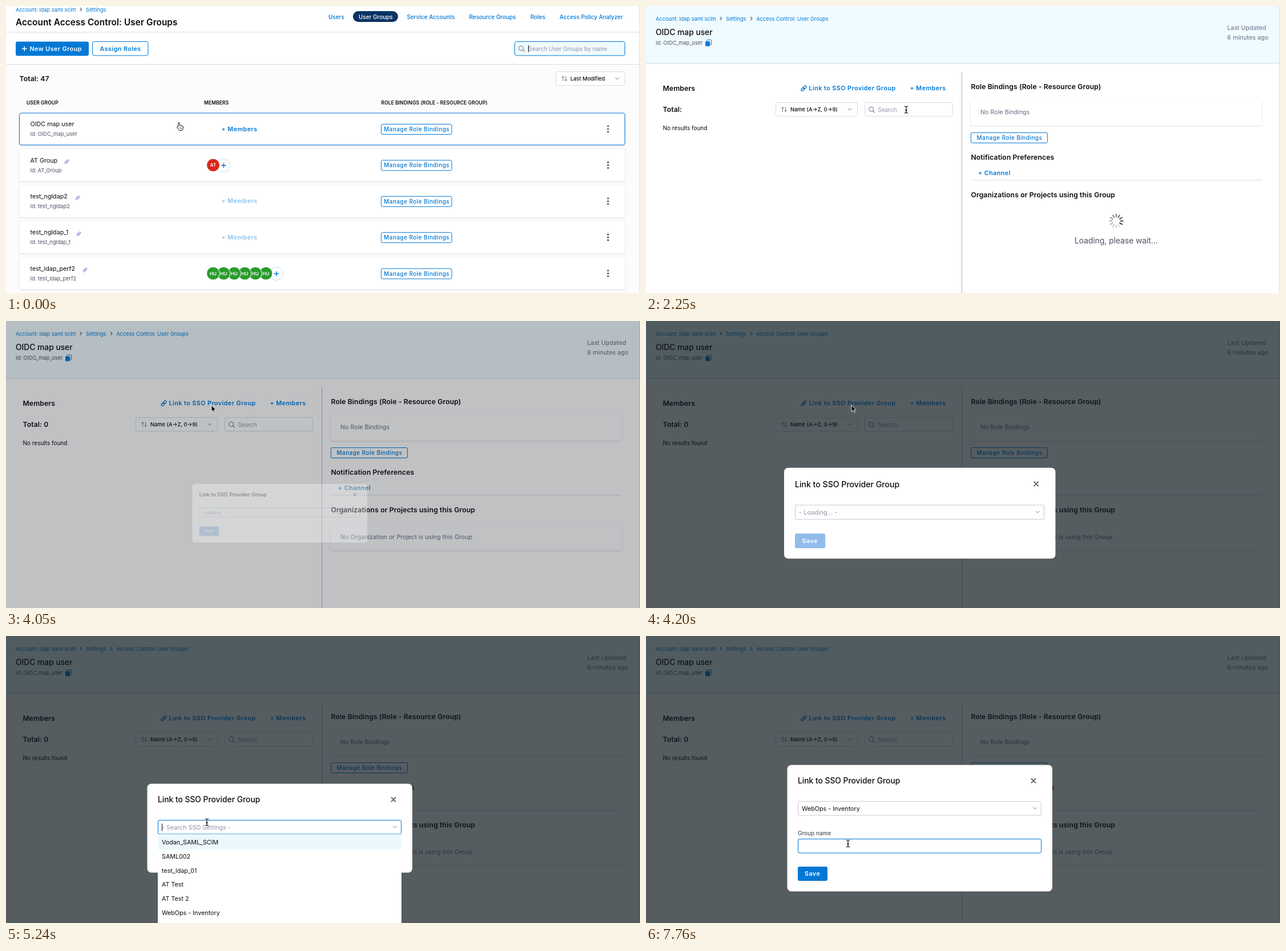
These frames come from a looping animation (1111 by 504 pixels, 8000 ms). An HTML page:

```html
<!DOCTYPE html>
<html lang="en">
<head>
<meta charset="utf-8">
<title>User groups</title>
<style>
  html, body { margin: 0; width: 100%; height: 100%; overflow: hidden; background: #fff; }
  svg { display: block; width: 100vw; height: 100vh; }
  text { font-family: Inter, "Open Sans", sans-serif; font-optical-sizing: none; dominant-baseline: central; white-space: pre; }
</style>
</head>
<body>
<svg id="stage" viewBox="0 0 1111 504"></svg>
<script>
const LOOP = 8000;
const BLUE = '#0278d5', INK = '#0b0b0d', SLATE = '#4f5162', GREY = '#6b6d85',
      MUTED = '#9293ab', LINE = '#d9dae5', PALE = '#effbff';

// Cursor steps: start time, x, y, kind
const CURSOR = [
  [0, 303, 205, 'hand'], [150, 303, 206, 'hand'], [300, 303, 208, 'hand'], [450, 304, 209, 'hand'],
  [1800, 330, 205, 'arrow'], [1950, 375, 196, 'arrow'], [2100, 430, 186, 'beam'], [2250, 456, 182, 'beam'],
  [2400, 450, 176, 'beam'], [2550, 420, 156, 'arrow'], [2700, 403, 152, 'hand'], [2850, 380, 150, 'hand'],
  [3000, 355, 150, 'hand'], [3150, 339, 150, 'hand'], [3300, 346, 149, 'hand'], [3450, 355, 148, 'hand'],
  [3600, 360, 148, 'hand'], [4050, 360, 148, 'arrow'], [4340, 360, 165, 'arrow'], [4490, 358, 215, 'arrow'],
  [4640, 355, 275, 'arrow'], [4790, 353, 321, 'beam'], [4940, 352, 323, 'beam'], [5090, 352, 326, 'beam'],
  [5240, 352, 327, 'beam'], [5540, 350, 338, 'beam'], [5690, 338, 385, 'arrow'], [5840, 318, 430, 'arrow'],
  [5990, 302, 470, 'arrow'], [6140, 293, 491, 'arrow'], [6580, 300, 470, 'arrow'], [6730, 318, 440, 'arrow'],
  [6880, 336, 400, 'arrow'], [7030, 350, 372, 'beam'], [7180, 354, 366, 'beam'], [7310, 354, 364.5, 'beam']
];

// Dialog entrance: start time, scale, opacity, backdrop opacity
const ENTRANCE = [[4050, .66, .32, .38], [4200, 1.0237, 1, 1], [4340, 1, 1, 1]];

const OPTIONS = ['Vodan_SAML_SCIM', 'SAML002', 'test_ldap_01', 'AT Test', 'AT Test 2', 'WebOps - Inventory'];

const GROUPS = [
  { name: 'OIDC map user', id: 'OIDC_map_user', add: 1 },
  { name: 'AT Group', id: 'AT_Group', link: 106.5, initials: 'AT', color: '#da291d', count: 1 },
  { name: 'test_ngldap2', id: 'test_ngldap2', link: 125.5, add: .45 },
  { name: 'test_ngldap_1', id: 'test_ngldap_1', link: 127.5, add: .45 },
  { name: 'test_ldap_perf2', id: 'test_ldap_perf2', link: 138.5, initials: 'HU', color: '#299b2c', count: 6 }
];

const during = (t, from, to) => t >= from && t < to;
const latest = (steps, t) => steps.filter(s => s[0] <= t).pop();

// Drawing helpers; text is placed by the middle of its capitals
const text = (x, y, str, size, fill = INK, weight = 400, extra = '') =>
  `<text x="${x}" y="${y}" font-size="${size}" fill="${fill}" font-weight="${weight}" ${extra}>${str}</text>`;
const rect = (x, y, w, h, fill, stroke = 'none', r = 0, extra = '') =>
  `<rect x="${x}" y="${y}" width="${w}" height="${h}" rx="${r}" fill="${fill}" stroke="${stroke}" ${extra}/>`;
const path = (d, stroke, width = 1, extra = '') =>
  `<path d="${d}" fill="none" stroke="${stroke}" stroke-width="${width}" stroke-linecap="round" stroke-linejoin="round" ${extra}/>`;
const circle = (x, y, r, fill, stroke = 'none') =>
  `<circle cx="${x}" cy="${y}" r="${r}" fill="${fill}" stroke="${stroke}"/>`;
const at = (x, y, body, more = '') => `<g transform="translate(${x} ${y}) ${more}">${body}</g>`;

const action = (x, y, str, fill = BLUE, extra = '') =>
  text(x, y, str, 10.73, fill, 600, `letter-spacing=".46" ${extra}`);
const heading = (x, y, str, size = 12.2) => text(x, y, str, size, INK, 600, 'letter-spacing=".1"');
const title = (x, y, str) => text(x, y, str, 13.8, INK, 500);
const small = (x, y, str, fill = SLATE) => text(x, y, str, 9.2, fill);
const caret = (x, y, h = 12) => rect(x, y, 1, h, '#000');
const card = (x, y, w, h, stroke) => rect(x, y, w, h, '#fff', stroke, 3.5, 'filter="url(#shadow)"');
const field = (y, focused) => rect(266.5, y, 426, 24.5, '#fff', focused ? BLUE : '#c9cad8', 2.5);
const chevron = (x, y) => path(`M${x - 3} ${y - 1.5}l3 3 3-3`, GREY, .9);
const magnifier = (x, y) => circle(x - .8, y - .8, 4, 'none', GREY) + path(`M${x + 2.2} ${y + 2.2}l2.8 2.8`, GREY, 1.1);
const sortIcon = (x, y) =>
  path(`M${x - 2.5} ${y + 4}v-8l-2 2.2m2-2.2l2 2.2M${x + 2.5} ${y - 4}v8l-2-2.2m2 2.2l2-2.2`, GREY, .9);
const chain = (x, y, scale, color) => at(x, y,
  rect(-6.6, -2.4, 7.4, 4.8, 'none', color, 2.4, 'stroke-width="1.5"') +
  rect(-.8, -2.4, 7.4, 4.8, 'none', color, 2.4, 'stroke-width="1.5"'), `rotate(-45) scale(${scale})`);

function bindingsButton(x, y, padding) {
  return rect(x, y - 8.5, 114 + 2 * padding, 18, '#fff', BLUE, 2.5) +
    text(x + padding, y, 'Manage Role Bindings', 9.96, BLUE, 500, 'letter-spacing=".46"');
}

function breadcrumb(y, ...items) {
  const xs = [17, 140, 193.5];
  return items.map((item, i) => small(xs[i], y, item, BLUE) +
    (i ? path(`M${xs[i] - 10} ${y - 2.6}l2.6 2.6-2.6 2.6`, SLATE, 1.1) : '')).join('');
}

function avatars(group, y) {
  const x = i => 363 + 18.5 * i;
  let out = circle(x(group.count), y + .5, 11.5, '#fff', '#b9e3fa') +
    path(`M${x(group.count) - 3.7} ${y + .5}h7.4m-3.7-3.7v7.4`, BLUE, 1.5);
  for (let i = group.count - 1; i >= 0; i--)
    out += circle(x(i), y, 11.4, group.color, '#fff') +
      text(x(i), y, group.initials, 8, '#fff', 600, 'text-anchor="middle"');
  return out;
}

function groupRow(group, i) {
  const y = 216 + 63.4 * i;
  return card(23.5, y - 28, 1061, 56, i ? 'none' : BLUE) +
    text(42.5, y - 8.3, group.name, 10.73) + small(42.5, y + 8.6, 'Id: ' + group.id) +
    (group.link ? chain(group.link, y - 6, .62, '#6b5bd6') : '') +
    (group.add ? action(377.5, y, '+ Members', BLUE, `opacity="${group.add}"`) : avatars(group, y)) +
    bindingsButton(657.5, y, 4.8) +
    [-5, 0, 5].map(d => circle(1055, y + d, 1.6, SLATE)).join('');
}

function listPage() {
  const tabs = [[565, 'Users'], [618, 'User Groups'], [702.5, 'Service Accounts'],
    [811.5, 'Resource Groups'], [919, 'Roles'], [970, 'Access Policy Analyzer']];
  return rect(0, 0, 1111, 102, '#fff') + rect(0, 102, 1111, 402, '#fcfcfd') +
    rect(0, 45.5, 1111, 1, LINE) + rect(0, 102, 1111, 1, LINE) +
    breadcrumb(6, 'Account: ldap saml scim', 'Settings') +
    heading(17, 28, 'Account Access Control: User Groups', 15.3) +
    rect(608, 9, 79, 19, '#0a3364', 'none', 9.5) +
    tabs.map(([x, label], i) => text(x, 18.5, label, 9.96, i === 1 ? '#fff' : BLUE, 500)).join('') +
    rect(17, 62.5, 128, 25, BLUE, 'none', 3) +
    path('M28.5 75h7.5m-3.75-3.75v7.5', '#fff', 1.5) + action(41.5, 75, 'New User Group', '#fff') +
    rect(151.5, 62.5, 97.5, 24.5, '#fff', BLUE, 3) + action(164.5, 75, 'Assign Roles') +
    rect(891.5, 62.5, 193, 24.5, PALE, BLUE, 3) + magnifier(903.5, 75) +
    text(915.5, 75, 'Search User Groups by name', 9.96, MUTED) +
    heading(23.5, 127.5, 'Total: 47') +
    rect(963.5, 115.5, 121, 24, '#fff', LINE, 3) + sortIcon(978.5, 127.5) +
    text(989, 127.5, 'Last Modified', 9.3, INK, 500) + chevron(1071, 127.5) +
    [[36, 'USER GROUP'], [347, 'MEMBERS'], [657.5, 'ROLE BINDINGS (ROLE - RESOURCE GROUP)']]
      .map(([x, label]) => heading(x, 169.5, label, 8.5)).join('') +
    GROUPS.map(groupRow).join('');
}

function spinner(t) {
  const turn = Math.floor((t - 2250) / 75);
  let out = '';
  for (let i = 0; i < 12; i++)
    out += `<path d="M0-7.2V-11.8" stroke="#383946" stroke-width="2" stroke-linecap="round" ` +
      `opacity="${.15 + .85 * i / 11}" transform="rotate(${30 * (i + 5 + turn)})"/>`;
  return at(824, 377.5, out);
}

function detailPage(t) {
  const loaded = t >= 2550;
  return rect(0, 0, 1111, 504, '#fff') + rect(0, 0, 1111, 100.5, PALE) + rect(0, 100, 1111, 1, '#cdd8ea') +
    breadcrumb(22, 'Account: ldap saml scim', 'Settings', 'Access Control: User Groups') +
    title(17, 45.5, 'OIDC map user') + small(17, 64.5, 'Id: OIDC_map_user') +
    rect(106.5, 59.5, 8, 8.5, PALE, BLUE, 1) + rect(104, 62, 8, 8.5, BLUE, 'none', 1) +
    text(1018.5, 38, 'Last Updated', 10.8, GREY) + text(1018.5, 55, '6 minutes ago', 10.8, GREY) +
    rect(553, 117, 1, 387, '#b0b1c4') +
    heading(29.5, 144.5, 'Members') + chain(276.5, 144.5, .85, BLUE) +
    action(285.5, 144.5, 'Link to SSO Provider Group') + action(462.5, 144.5, '+ Members') +
    heading(29.5, 181.5, loaded ? 'Total: 0' : 'Total:') +
    rect(227.5, 169.5, 143, 24, '#fff', LINE, 3) + sortIcon(242, 181.5) +
    text(253, 181.5, 'Name (A→Z, 0→9)', 9.3, INK, 500) + chevron(357, 181.5) +
    rect(383.5, 169.5, 154, 24, '#fff', LINE, 3) + magnifier(395.5, 182) + text(406.5, 182, 'Search', 9.96, MUTED) +
    text(29.5, 214, 'No results found', 9.96) +
    heading(569.5, 141.5, 'Role Bindings (Role - Resource Group)') +
    card(569, 164, 510, 46) + text(586, 186.5, 'No Role Bindings', 10.73, GREY) +
    bindingsButton(569.5, 231, 10) +
    heading(569.5, 265, 'Notification Preferences') + action(582, 293, '+ Channel') +
    rect(569, 305.5, 510, 1, LINE) +
    heading(569.5, 331, 'Organizations or Projects using this Group') +
    (loaded
      ? card(569, 356, 510, 46.5) + text(586, 379, 'No Organization or Project is using this Group', 10.73, GREY)
      : spinner(t) + text(751, 412, 'Loading, please wait...', 13.8, SLATE));
}

function dropdown(cursorY) {
  const pitch = 24.75, hovered = Math.floor((cursorY - 350) / pitch);
  return rect(266, 348.5, 427, 156, '#fff') + OPTIONS.map((label, i) =>
    (i === 0 || i === hovered ? rect(266.5, 350 + pitch * i, 426, pitch, '#ebf7fd') : '') +
    text(273, 362.6 + pitch * i, label, 10.73)).join('');
}

function dialog(t, cursorY) {
  const chosen = t >= 6440, open = during(t, 5090, 6440), focused = during(t, 5090, 6290);
  const label = chosen ? OPTIONS[5] : t < 4490 ? '- Loading... -' : '- Search SSO Settings -';
  const header = rect(247.5, 259.5, 464.5, chosen ? 222 : 156, '#fff', 'none', 7) +
    title(266, 287.3, 'Link to SSO Provider Group') +
    path('M675.5 283.7l7 7m0-7l-7 7', SLATE, 1.7) +
    field(323.5, focused) +
    text(273, 336, label, 10.73, chosen ? INK : MUTED) + chevron(681.5, 335.5);
  const saveY = chosen ? 405 : 372.5;
  const save = rect(266, saveY, 52, 25, chosen ? BLUE : '#90bcea', 'none', 3) +
    action(278, saveY + 12.5, 'Save', '#fff');

  if (!chosen) return header + save + (open ? dropdown(cursorY) : '') +
    (focused && !during(t, 5690, 6140) ? caret(273, 329.5, 13) : '');

  return at(0, -33, header) + text(266, 346, 'Group name', 9.96, SLATE, 500) + field(356.5, t >= 7310) +
    (during(t, 7310, 7760) ? caret(275, 362, 14) : '') + save;
}

const POINTERS = {
  hand: '<path d="M-1.2 7.2V1a1.2 1.2 0 0 1 2.4 0V4.6l4.6.9q1.9.4 1.8 2.2l-.6 3q-.4 2.8-2.6 2.8H1.6q-1 0-1.8-1.1L-3.2 8.3q-.5-1 .3-1.5t1.7.4z" fill="#fff" stroke="#000" stroke-width="1"/>' +
    path('M2.2 8.2v2.6M4.2 8.2v2.6', '#000', .7),
  arrow: '<path d="M0 0V11.2L2.6 8.8 4.4 12.8 6.2 12 4.5 8.1H8z" fill="#000" stroke="#fff" stroke-width=".9"/>',
  beam: ['#fff', '#000'].map((color, i) =>
    path('M-2.8-6q2.3 0 2.8 1.3Q.5-6 2.8-6M0-4.7V4.7M-2.8 6q2.3 0 2.8-1.3Q.5 6 2.8 6M-1.3.8h2.6', color, i ? 1.2 : 2.4)).join('')
};

const DEFS = '<defs><filter id="shadow" x="-5%" y="-30%" width="110%" height="160%">' +
  '<feDropShadow dx="0" dy="1" stdDeviation="1.6" flood-color="#606880" flood-opacity=".25"/></filter></defs>';

function scene(t) {
  const [, x, y, kind] = latest(CURSOR, t);
  let out = t < 1650
    ? listPage() + (during(t, 300, 900) || t >= 1350 ? '' : caret(915, 69))
    : detailPage(t);
  out += rect(1110, 0, 1, 504, LINE);
  const entrance = latest(ENTRANCE, t);
  if (entrance) {
    const [, scale, opacity, shade] = entrance;
    out += rect(0, 0, 1111, 504, '#0f191f', 'none', 0, `opacity="${.7 * shade}"`) +
      `<g opacity="${opacity}" transform="translate(480 337.7) scale(${scale}) translate(-480 -337.7)">${dialog(t, y)}</g>`;
  }
  return DEFS + out + at(x, y, POINTERS[kind]);
}

const stage = document.getElementById('stage');
const start = performance.now();
let shown = '';
function tick() {
  const markup = scene((performance.now() - start) % LOOP);
  if (markup !== shown) stage.innerHTML = shown = markup;
  requestAnimationFrame(tick);
}
tick();
</script>
</body>
</html>
```
